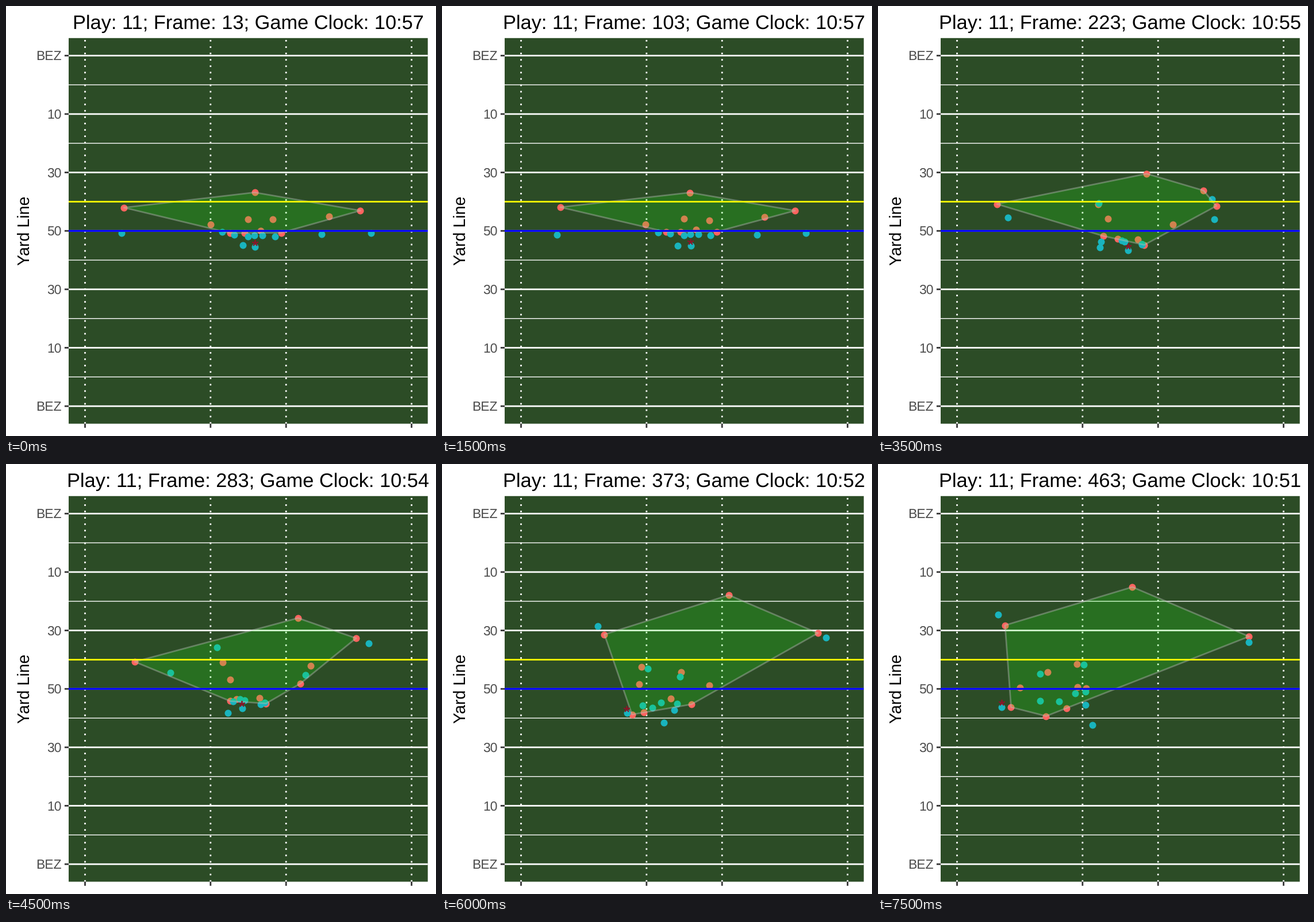
Animation, 748 px wide and 748 px high, one loop 8 s. Source, as a matplotlib script:

```python
import matplotlib.pyplot as plt
import numpy as np
from matplotlib.animation import FuncAnimation
from matplotlib.patches import Polygon, Rectangle

SIZE, DPI = 748, 100
PT = 72 / DPI  # points per pixel
LEFT, RIGHT, TOP, BOTTOM = 109, 733.7, 55.8, 726.6
MID, STEP = (TOP + BOTTOM) / 2, (BOTTOM - TOP) / 6.6
THICK = 2.77
THIN = THICK / 2
DEFENSE, OFFENSE = "#ff645f", "#19b4be"
STEPS, INTERVAL, SNAP = 16, 500, 3

plt.rcParams["font.family"] = "Liberation Sans"
plt.rcParams["text.hinting"] = "none"
plt.rcParams["path.snap"] = False
rng = np.random.default_rng(11)

fig = plt.figure(figsize=(SIZE / DPI, SIZE / DPI), dpi=DPI, facecolor="white")
ax = fig.add_axes([0, 0, 1, 1])
ax.set(xlim=(0, SIZE), ylim=(SIZE, 0))
ax.axis("off")


def line(x, y, color, width, z, **kw):
    ax.plot(x, y, color=color, lw=width * PT, zorder=z,
            solid_capstyle="butt", dash_capstyle="butt", **kw)


def label(x, y, text, px, color="black", **kw):
    return ax.text(x, y, text, fontsize=px * PT, color=color, va="baseline", **kw)


def glide(*points):
    """Smooth curve through points spread evenly from the snap to the end."""
    p = np.array(points, float)
    slope = np.gradient(p, axis=0)
    t = np.clip((np.arange(STEPS) - SNAP) / (STEPS - 1 - SNAP), 0, 1) * (len(p) - 1)
    i = np.minimum(t.astype(int), len(p) - 2)
    u = (t - i)[:, None]
    return ((1 + 2 * u) * (1 - u) ** 2 * p[i] + u * (1 - u) ** 2 * slope[i]
            + u * u * (3 - 2 * u) * p[i + 1] + u * u * (u - 1) * slope[i + 1])


def run(*points):
    """Own route, with a slight shuffle before the snap."""
    shuffle = np.maximum(1 - np.arange(STEPS) / SNAP, 0)[:, None]
    return glide(*points) + shuffle * rng.normal(0, 1.5, 2)


def mark(lead, *gaps):
    """Follow another player at a changing distance."""
    return lead + glide(*gaps)


def hull(points):
    pts = sorted(map(tuple, points))

    def chain(seq):
        out = []
        for x, y in seq:
            while len(out) > 1:
                (x0, y0), (x1, y1) = out[-2:]
                if (x1 - x0) * (y - y0) - (y1 - y0) * (x - x0) > 0:
                    break
                out.pop()
            out.append((x, y))
        return out[:-1]

    return chain(pts) + chain(pts[::-1])


# Field
ax.add_patch(Rectangle((LEFT, TOP), RIGHT - LEFT, BOTTOM - TOP, color="#2c4c26", lw=0, zorder=0))
for k in range(6):
    y = MID + (k - 2.5) * STEP
    line([LEFT, RIGHT], [y, y], "white", THIN, 1)
for k, name in enumerate(["BEZ", "10", "30", "50", "30", "10", "BEZ"]):
    y = MID + (k - 3) * STEP
    line([LEFT, RIGHT], [y, y], "white", THICK, 1)
    line([LEFT - 7.1, LEFT], [y, y], "#333333", THICK, 1)
    label(96.3, y + 8, name, 22.9, "#4d4d4d", ha="right")
for x in (137.5, 355.8, 487.2, 705.5):
    line([x, x], [BOTTOM, TOP], "white", THICK, 1, ls=(0, (1, 3)))
    line([x, x], [BOTTOM, BOTTOM + 7.1], "#333333", THICK, 1)
line([LEFT, RIGHT], [MID - STEP / 2] * 2, "yellow", THICK, 5)
line([LEFT, RIGHT], [MID, MID], "blue", 3.2, 5)
label(41, MID, "Yard Line", 28.6, rotation=90, rotation_mode="anchor", ha="center")
title = label((LEFT + RIGHT) / 2, 39.5, "", 34.4, ha="center")

# Ball carrier, receivers and the deep defenders
passer = run((433, 417), (440, 425), (411, 424.5), (322, 433), (215.5, 422.5))
back = run((410.5, 416.5), (386, 420), (388, 447), (373.5, 454))
tight = run((376, 393.5), (385, 356), (367, 318.5), (271.5, 282), (209, 262))
slot = run((548, 397.5), (560, 350), (631, 312), (668.5, 302), (645.5, 309.5))
wide_l = run((200, 398), (204, 372), (286, 362.5), (358.5, 356), (282, 365))
wide_r = run((633, 395), (609, 375), (521.5, 366.5), (414.5, 369.5), (358.5, 349))
safety = run((431.5, 324.5), (448, 302), (508, 268), (499, 228), (442.5, 214))
corner_l = run((206, 350), (203, 343), (224, 344), (282.5, 296.5), (221, 280.5))
backer_l = run((354.5, 380), (383, 344.5), (360, 351), (295, 361.5))
backer_m = run((421.5, 370), (400, 370), (367, 381), (247.5, 389))
backer_r = run((465.5, 373), (513, 380), (489, 384), (362.5, 390))

# Man coverage, pass rush and blocks
corner_r = mark(wide_r, (-19, -39), (9, -16), (-12, -1))
nickel = mark(slot, (13.5, -31), (-22, -9), (0, -9.5))
end_l = mark(passer, (-43, -24), (-43, -25), (3, 1), (16, 0.5))
tackle_l = mark(passer, (-18, -24.5), (-10, -16), (77, 16))
tackle_r = mark(passer, (9.5, -28.5), (30, -18), (132, -35))
end_r = mark(passer, (45.5, -24.5), (28, -12), (41.5, -8), (112, -15), (112.5, 2))
block_a = mark(passer, (-36, -21), (-47, -15), (26, -9), (99.5, -9.5))
block_b = mark(tackle_l, (6, 6), (6, 0), (-10.5, -26.5))
block_c = mark(tackle_r, (-10.5, 8.5), (-26, 4), (-4, 11))
block_d = mark(tackle_r, (3.5, 8.5), (14, 8.5))
block_e = mark(passer, (34.5, -18.5), (32, -6.5), (146, -4))

defense = np.stack([corner_l, safety, corner_r, nickel, backer_l, backer_m, backer_r,
                    end_l, tackle_l, tackle_r, end_r], axis=1)
offense = np.stack([wide_l, tight, block_a, block_b, block_c, block_d, block_e,
                    back, passer, slot, wide_r], axis=1)


def dots(color, z):
    return ax.plot([], [], "o", color=color, ms=12 * PT, mew=0, zorder=z)[0]


def_dots, off_dots = dots(DEFENSE, 2), dots(OFFENSE, 2.1)
ball, = ax.plot([], [], marker=(5, 2, 0), color="#8c1428", ms=11 * PT, mew=1.8 * PT, zorder=4)
cover = Polygon([(0, 0)] * 3, fc=(0.1, 1, 0.05, 0.2), ec=(0.75, 0.75, 0.75, 0.4),
                lw=THICK * PT, joinstyle="round", zorder=3)
ax.add_patch(cover)


def update(step):
    second = 57 - max(step - 2, 0) // 2
    title.set_text(f"Play: 11; Frame: {13 + 30 * step}; Game Clock: 10:{second}")
    def_dots.set_data(*defense[step].T)
    off_dots.set_data(*offense[step].T)
    cover.set_xy(hull(defense[step]))
    x, y = passer[step]
    ball.set_data([x - 0.5], [y - 7.5])
    return title, def_dots, off_dots, cover, ball


anim = FuncAnimation(fig, update, frames=STEPS, interval=INTERVAL, repeat=True, repeat_delay=0)
plt.show()
```
